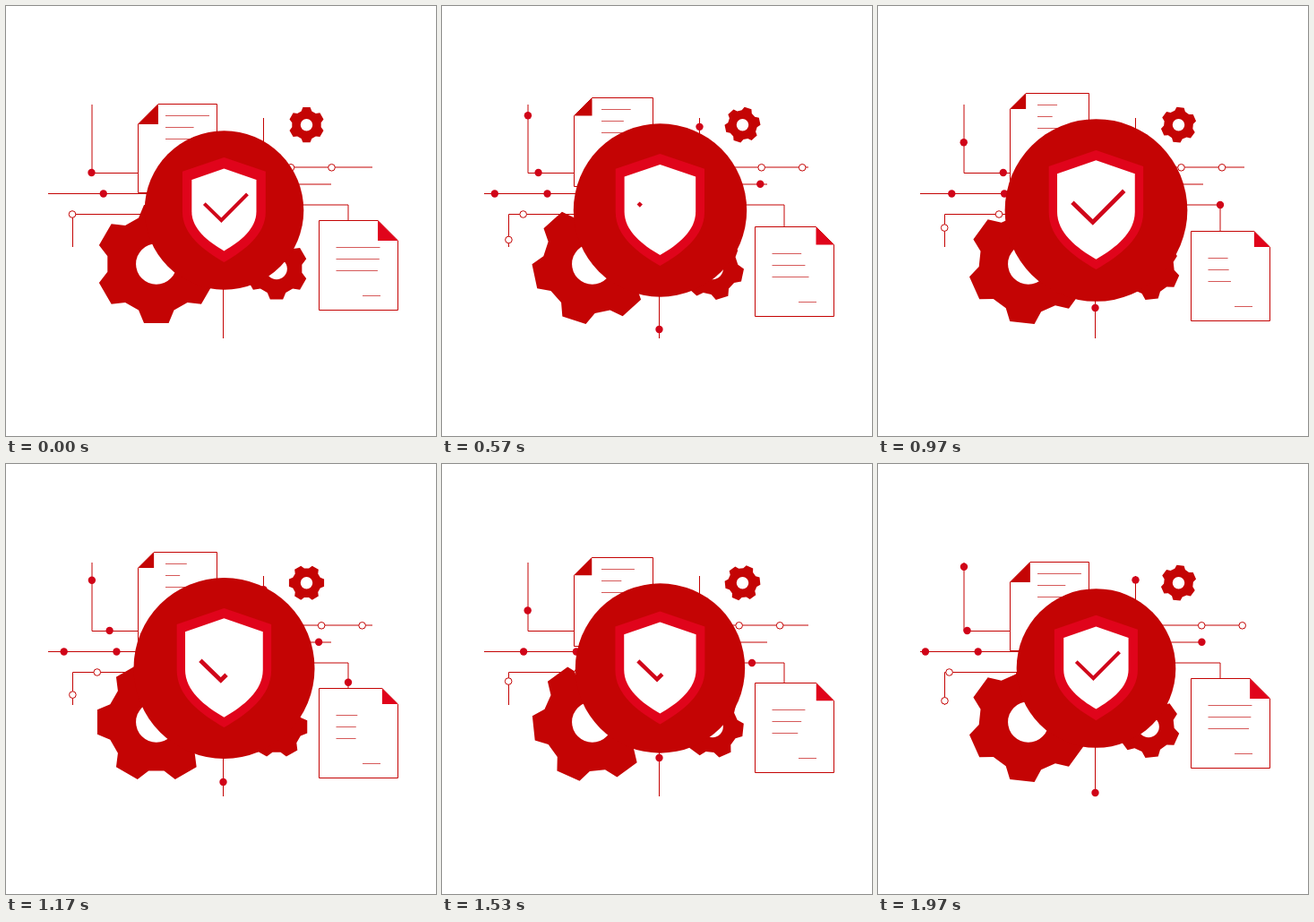
Write an HTML page with a canvas that moves like this. It is 480 px wide and 480 px high and loops after 2 s.

```html
<!DOCTYPE html>
<html lang="en">
<head>
<meta charset="utf-8">
<title>Data protection</title>
<style>
html, body { margin: 0; width: 100%; height: 100%; overflow: hidden; background: #fff; }
canvas { display: block; width: 480px; height: 480px; }
</style>
</head>
<body>
<canvas id="stage" width="480" height="480"></canvas>
<script>
const ctx = document.getElementById('stage').getContext('2d');
const RED = '#c40404', BRIGHT = '#e0041b', DOT = '#d00418', PALE = '#d65a5a', WHITE = '#fff';
const STEPS = 60, CYCLE = 20;

// Wires, each with the dots that run along it as [step, x, y].
const wires = [
  { line: [[96, 110], [96, 186.5], [160, 186.5]],
    run: [[0, 176, 186], [20, 95.5, 186], [40, 96, 111]] },
  { line: [[47, 209.5], [160, 209.5]],
    run: [[0, 167.5, 209.5], [40, 50, 209.5]] },
  { line: [[74.5, 269], [74.5, 232.5], [160, 232.5]], open: true,
    run: [[0, 185, 232.5], [20, 74, 232.5], [40, 74.5, 266]] },
  { line: [[287.5, 125], [287.5, 180]],
    run: [[0, 287.5, 181], [20, 287.5, 126.7]] },
  { line: [[300, 180], [409, 180]], open: true,
    run: [[0, 318, 180.3], [40, 409, 180.3]] },
  { line: [[300, 199], [363, 199]],
    run: [[0, 303, 198.7], [20, 364.5, 198.7]] },
  { line: [[300, 222], [382, 222], [382, 260]],
    run: [[0, 274, 222], [9, 382, 222], [20, 382, 262]] },
  { line: [[242.5, 300], [242.5, 371]],
    run: [[0, 242.5, 310], [20, 242.5, 370]] }
];

// Shown share of the check mark over the loop.
const checkKeys = [[0, 1], [8, 1], [18.6, 0], [28, 1], [30, 1], [40, 0], [41, 0], [51, 1], [60, 1]];

const smooth = k => k * k * (3 - 2 * k);
const pulse = n => (1 - Math.cos(n / STEPS * 2 * Math.PI)) / 2;
const snap = v => Math.floor(v) + 0.5;

function trace(points, closed) {
  ctx.beginPath();
  points.forEach(([x, y]) => ctx.lineTo(x, y));
  if (closed) ctx.closePath();
}

function stroke(color, width) {
  ctx.strokeStyle = color;
  ctx.lineWidth = width;
  ctx.stroke();
}

function fill(color) {
  ctx.fillStyle = color;
  ctx.fill();
}

function disc(x, y, r, color) {
  ctx.beginPath();
  ctx.arc(x, y, r, 0, 2 * Math.PI);
  fill(color);
}

function keyed(keys, at, ease = k => k) {
  const i = Math.max(1, keys.findIndex(key => key[0] >= at));
  const a = keys[i - 1], b = keys[i];
  const k = ease((at - a[0]) / (b[0] - a[0]));
  return a.slice(1).map((v, j) => v + (b[j + 1] - v) * k);
}

function gear(x, y, r, turn) {
  const points = [];
  for (let tooth = 0; tooth < 6; tooth++) {
    for (const [deg, size] of [[-21, 0.82], [-11.8, 1], [11.8, 1], [21, 0.82]]) {
      const a = (90 + tooth * 60 + deg + turn) * Math.PI / 180;
      points.push([x + r * size * Math.cos(a), y + r * size * Math.sin(a)]);
    }
  }
  trace(points, true);
  fill(RED);
  disc(x, y, r * 0.338, WHITE);
}

function drawWires(n) {
  for (const { line, run, open } of wires) {
    trace(line);
    stroke(RED, 1);
    const last = run[run.length - 1][0];
    for (let at = n % CYCLE; at < last; at += CYCLE) {
      const [x, y] = keyed(run, at);
      disc(x, y, open ? 3.8 : 4.2, open ? WHITE : DOT);
      if (open) stroke(RED, 1);
    }
  }
}

// Page outline with a folded corner; side is -1 for left, 1 for right.
function page(left, top, height, side, fold, foldColor) {
  const right = left + 88, bottom = top + height;
  const edge = side < 0 ? left : right, far = side < 0 ? right : left;
  const inner = edge - side * fold;
  trace([[far, top], [inner, top], [edge, top + fold], [edge, bottom], [far, bottom]], true);
  fill(WHITE);
  stroke(RED, 1);
  trace([[inner, top], [inner, top + fold], [edge, top + fold]], true);
  fill(foldColor);
}

function textLine(x, y, length) {
  trace([[x, y], [x + length, y]]);
  stroke(PALE, 1);
}

function drawPages(n) {
  const e = pulse(n), fold = 22.5 - 5 * pulse(n - 2);
  const top = snap(109.7 - 12.2 * e), low = snap(239 + 12.2 * e);
  page(147.5, top, 99, -1, fold, RED);
  page(349.5, low, 100, 1, fold, BRIGHT);
  [[49, 27], [32, 16], [45, 22]].forEach(([full, cut], i) => {
    const late = pulse(n - 3 * i);
    textLine(178, top + 13 + 13 * i, full - cut * late);
    textLine(368.5, low + 30 + 13 * i, 49 - 27 * late);
  });
  textLine(398, low + 84, 20);
}

function shield(w, h, color) {
  ctx.beginPath();
  ctx.moveTo(0, -h);
  ctx.lineTo(w, -0.73 * h);
  ctx.lineTo(w, 0.04 * h);
  ctx.bezierCurveTo(w, 0.47 * h, 0.5 * w, 0.77 * h, 0, h);
  ctx.bezierCurveTo(-0.5 * w, 0.77 * h, -w, 0.47 * h, -w, 0.04 * h);
  ctx.lineTo(-w, -0.73 * h);
  ctx.closePath();
  fill(color);
}

function drawBadge(n) {
  disc(243.5, 228, 88.8 + 13.1 * pulse(n), RED);
  const e = pulse(n - 2), outer = 1 + 0.14 * e, inner = 1 + 0.21 * e;
  ctx.save();
  ctx.translate(243.4, 227.5);
  shield(46.4 * outer, 58.5 * outer, BRIGHT);
  ctx.scale(inner, inner);
  shield(36, 45.8, WHITE);
  const [shown] = keyed(checkKeys, n, smooth);
  if (shown > 0) {
    const points = [[-22, -6.8], [-3, 11.6], [26, -17.6]];
    const total = 67.6;
    ctx.setLineDash([total * shown, 2 * total]);
    trace(points);
    stroke('#d0061a', 4);
  }
  ctx.restore();
}

function draw(n) {
  ctx.fillStyle = WHITE;
  ctx.fillRect(0, 0, 480, 480);
  const turn = n * 360 / STEPS;
  gear(167.8, 288, 67.3, -turn);
  gear(302, 293.3, 35, turn);
  gear(335.5, 132.7, 20, -turn);
  drawWires(n);
  drawPages(n);
  drawBadge(n);
}

// Three steps per 100 ms, held 30, 40 and 30 ms.
function stepAt(ms) {
  const t = ms % 2000, rest = t % 100;
  return Math.floor(t / 100) * 3 + (rest >= 70 ? 2 : rest >= 30 ? 1 : 0);
}

const start = performance.now();
function tick() {
  draw(stepAt(performance.now() - start));
  requestAnimationFrame(tick);
}
tick();
</script>
</body>
</html>
```
